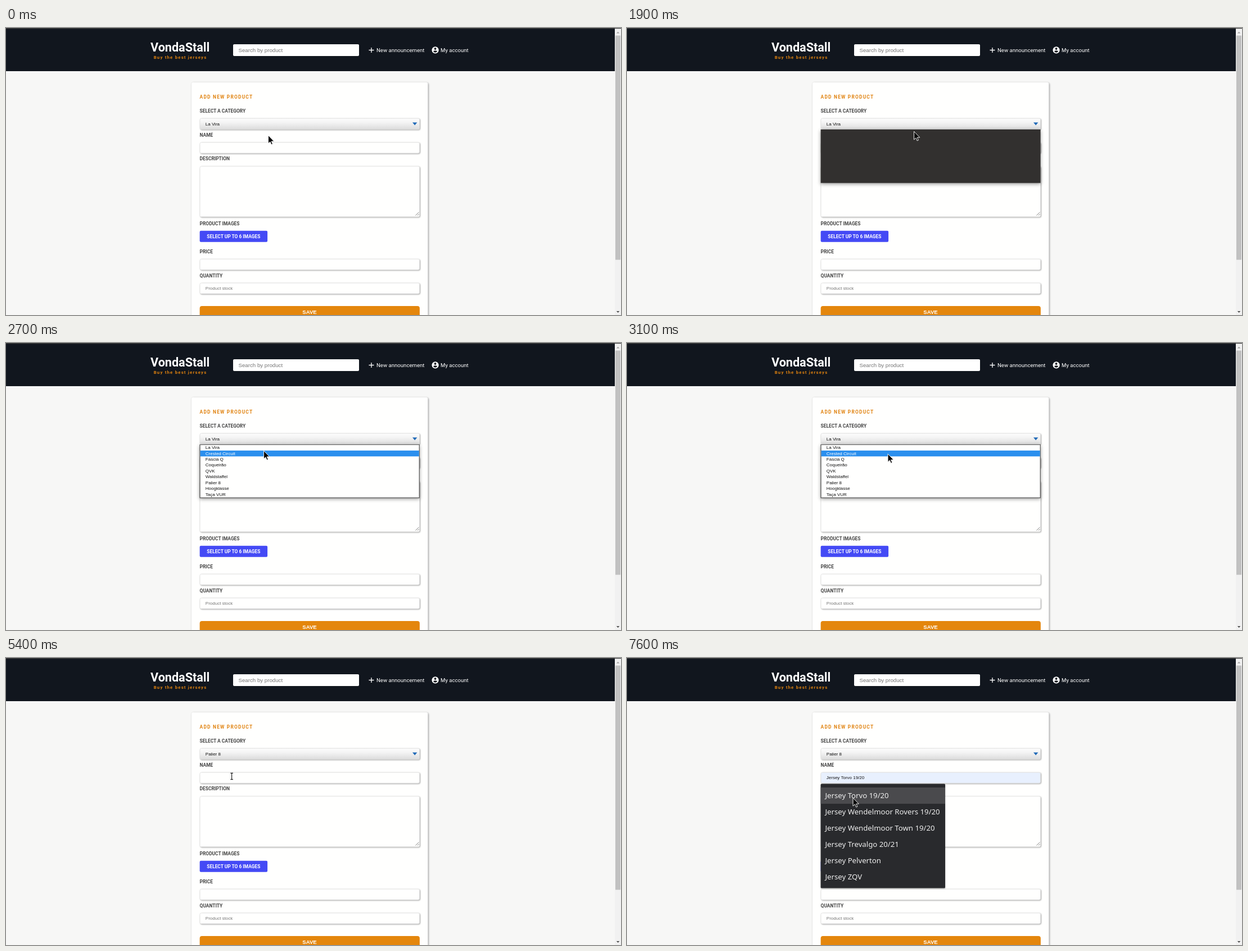
Recreate the animation shown at these times as an HTML page. Size 1094x512 px, loop 8000 ms.

```html
<!DOCTYPE html>
<html lang="en">
<head>
<meta charset="utf-8">
<title>Add new product</title>
<style>
  html, body { margin: 0; width: 100%; height: 100%; overflow: hidden; background: #f7f7f6; }
  svg { display: block; width: 100vw; height: 100vh; }
  text { font-family: Roboto, sans-serif; white-space: pre; }
  .label { font-size: 8.4px; font-weight: 700; fill: #454545; }
  .title { fill: #e0820f; letter-spacing: 1.2px; }
  .brand { font-size: 21.6px; font-weight: 700; fill: #fff; }
  .tagline { font-size: 7.8px; font-weight: 700; fill: #e0820f; letter-spacing: 1.2px; }
  .nav { font-size: 9.6px; fill: #fff; }
  .field { font: 8px "Liberation Sans", Arial, sans-serif; fill: #111; }
  .hint { fill: #757575; }
  .search { font-size: 9.7px; }
  .save { font: bold 9.6px "Liberation Sans", Arial, sans-serif; fill: #fff; }
  .suggestion { font: 500 13.2px "Noto Sans", sans-serif; fill: #eee; }
  .box { fill: #fffffe; stroke: #e2e2e2; stroke-width: .8; filter: drop-shadow(1px 1px 1px rgba(0,0,0,.36)); }
  .card { fill: #fffffe; filter: drop-shadow(1px 1px 1.5px rgba(0,0,0,.42)); }
  .list { filter: drop-shadow(0 2px 3px rgba(0,0,0,.4)); }
  .menu { fill: #292a2d; filter: drop-shadow(0 1px 1px rgba(0,0,0,.3)); }
</style>
</head>
<body>
<svg id="stage" viewBox="0 0 1094 512" preserveAspectRatio="none"></svg>
<script>
const LEAGUES = ["La Vira", "Crested Circuit", "Fascia Q", "Coqueirão", "QVK",
  "Waldstaffel", "Palier 8", "Hoogklasse", "Taça VUR"];
const JERSEYS = ["Torvo 19/20", "Wendelmoor Rovers 19/20", "Wendelmoor Town 19/20",
  "Trevalgo 20/21", "Pelverton", "ZQV"].map(name => "Jersey " + name);
const ROW = 10.45, LIST_TOP = 181.4, MENU_ROW = 29, MENU_TOP = 231;

const rect = (x, y, w, h, attrs = "") => `<rect x="${x}" y="${y}" width="${w}" height="${h}" ${attrs}/>`;
const text = (x, y, cls, content, attrs = "") => `<text x="${x}" y="${y}" class="${cls}" ${attrs}>${content}</text>`;
const box = (y, h, attrs = "") => rect(345, y, 390.6, h, `rx="2.5" class="box" ${attrs}`);
const label = (y, content) => text(344.6, y, "label", content);

const header = rect(0, 0, 1083, 77, 'fill="#11161e"') + rect(0, 0, 1094, 1.4, 'fill="#3b3b3b"')
  + text(257, 42, "brand", "VondaStall") + text(262.7, 55.3, "tagline", "Buy the best jerseys")
  + rect(404, 29, 224, 21, 'rx="2" fill="#fff"') + text(413.5, 43, "field hint search", "Search by product")
  + '<path d="M645.5 39.5h9M650 35v9" stroke="#fff" stroke-width="1.3"/>'
  + text(659, 43, "nav", "New announcement")
  + '<circle cx="763.6" cy="39.4" r="6.1" fill="#fff"/><circle cx="763.6" cy="37" r="1.9" fill="#11161e"/>'
  + '<path d="M759.9 41.6q3.7-2.7 7.4 0q-3.7 4.4-7.4 0z" fill="#11161e"/>'
  + text(773, 43, "nav", "My account");

const scrollbar = rect(1083, 1.4, 11, 511, 'fill="#f1f1f1"') + rect(1084, 13.5, 9, 400, 'fill="#c1c1c1"')
  + '<path d="M1085.8 9.6h5.6l-2.8-3z" fill="#a5a5a5"/><path d="M1085.8 505h5.6l-2.8 3z" fill="#505050"/>';

const form = rect(330, 97, 420.5, 430, 'rx="3" class="card"')
  + text(344.6, 126, "label title", "ADD NEW PRODUCT")
  + label(151, "SELECT A CATEGORY") + box(161.3, 19.5, 'style="fill:url(#shade)"')
  + '<path d="M723 168.6h8.4l-4.2 4.9z" fill="#1f69b7"/>'
  + text(354.8, 173.7, "field", "", 'id="category"')
  + label(193.8, "NAME") + box(204.2, 19, 'id="nameBox"')
  + text(354.8, 216.2, "field", "", 'id="name"') + rect(0, 209, .8, 9, 'id="caret" fill="#111"')
  + label(236.3, "DESCRIPTION") + box(246.8, 90)
  + '<path d="M728.5 334.5l6-6M732 334.5l2.5-2.5" stroke="#666" stroke-width=".8"/>'
  + label(352.2, "PRODUCT IMAGES") + rect(344.6, 361.7, 120.5, 20, 'rx="2" fill="#444af5"')
  + text(404.8, 374.6, "label", "SELECT UP TO 6 IMAGES", 'text-anchor="middle" style="fill:#fff"')
  + label(402, "PRICE") + box(412.3, 19)
  + label(444.6, "QUANTITY") + box(455, 19) + text(354.8, 467.2, "field hint", "Product stock")
  + rect(344.6, 496, 391.3, 24, 'rx="4" fill="#e4860c"')
  + text(540, 510, "save", "SAVE", 'text-anchor="middle"');

const dropdown = '<g id="dropdown">' + rect(344.6, 181, 391, 95.5, 'class="list" fill="#32302f"')
  + '<g id="options">' + rect(345.1, 181.4, 390, 94.6, 'fill="#fffffe" stroke="#555" stroke-width=".9"')
  + rect(345.5, 0, 389.2, ROW, 'id="highlight" fill="#2a8fee"')
  + LEAGUES.map((name, i) => text(354.8, 189.1 + i * ROW, "field option", name)).join("")
  + "</g></g>";

const menu = '<g id="menu">' + rect(344.6, 224.4, 221.4, 186.2, 'id="menuBox" class="menu" rx="1.5"')
  + rect(344.6, MENU_TOP, 221.4, MENU_ROW, 'id="menuHover" fill="#4a4a4d"')
  + JERSEYS.map((name, i) => text(352.5, 249.8 + i * MENU_ROW, "suggestion", name)).join("") + "</g>";

const cursor = '<path id="arrow" d="M0 0V14.6L3.3 11.5 5.6 16.6 7.9 15.6 5.7 10.7H10.3Z" fill="#080808" stroke="#fff" stroke-width=".9"/>'
  + '<path id="beam" d="M-2.2-5.6h1.6l.6.6.6-.6h1.6M0-5V5M-2.2 5.6h1.6l.6-.6.6.6h1.6" fill="none" stroke="#111" stroke-width="1.1"/>';

document.getElementById("stage").innerHTML =
  '<linearGradient id="shade" x2="0" y2="1"><stop stop-color="#fdfdfd"/><stop offset=".4" stop-color="#f3f3f3"/><stop offset="1" stop-color="#dcdcdc"/></linearGradient>'
  + rect(0, 0, 1094, 512, 'fill="#f7f7f6"') + header + form + dropdown + menu + scrollbar + cursor;

const el = id => document.getElementById(id);
const show = (id, visible) => el(id).setAttribute("display", visible ? "inline" : "none");
const options = [...document.querySelectorAll(".option")];

// Pointer stops: time, x, y
const PATH = [[100, 466.5, 191.5], [1000, 512, 173], [1700, 512, 173], [1900, 510.5, 184.5],
  [2700, 458.5, 192.2], [3100, 464, 197.8], [3400, 456, 271.5], [3500, 453, 256],
  [3900, 449, 238.7], [4100, 449, 238.7], [4300, 450, 245.5], [5000, 450, 245.5],
  [5400, 401.6, 211], [5800, 401.6, 211], [6000, 378, 216], [7200, 378, 216], [7600, 402, 249.5]];

function pointerAt(t) {
  const next = PATH.findIndex(stop => stop[0] > t);
  if (next < 1) return (next ? PATH[PATH.length - 1] : PATH[0]).slice(1);
  const [a, b] = [PATH[next - 1], PATH[next]];
  const k = (t - a[0]) / (b[0] - a[0]);
  return [a[1] + (b[1] - a[1]) * k, a[2] + (b[2] - a[2]) * k];
}

function draw(time) {
  const t = Math.floor(time % 8000 / 100) * 100;
  const [x, y] = pointerAt(t);

  show("dropdown", t >= 1300 && t < 4600);
  show("options", t >= 2000);
  const row = Math.max(0, Math.min(8, Math.floor((y - LIST_TOP) / ROW)));
  el("highlight").setAttribute("y", LIST_TOP + row * ROW);
  options.forEach((option, i) => option.style.fill = i === row ? "#fff" : "#111");
  el("category").textContent = LEAGUES[t < 4600 ? 0 : 6];

  const filled = t > 7200 && y >= MENU_TOP;
  const typed = "Jers".slice(0, [6600, 6800, 7100, 7300].filter(key => t >= key).length);
  el("name").textContent = filled ? JERSEYS[0] : typed;
  el("nameBox").style.fill = filled ? "#e8f0fe" : "#fffffe";
  el("caret").setAttribute("x", 355 + el("name").getComputedTextLength());
  show("caret", !filled && (t >= 5500 && t < 6200 || t >= 6600));

  show("menu", t >= 5500);
  el("menuBox").setAttribute("width", t < 6800 ? 238.5 : 221.4);
  show("menuHover", filled);

  const overInput = t > 4700 && y > 204 && y < 222;
  show("beam", overInput);
  show("arrow", !overInput);
  el(overInput ? "beam" : "arrow").setAttribute("transform", `translate(${x} ${y})`);
}

const start = performance.now();
function tick() {
  draw(performance.now() - start);
  requestAnimationFrame(tick);
}
tick();
</script>
</body>
</html>
```
